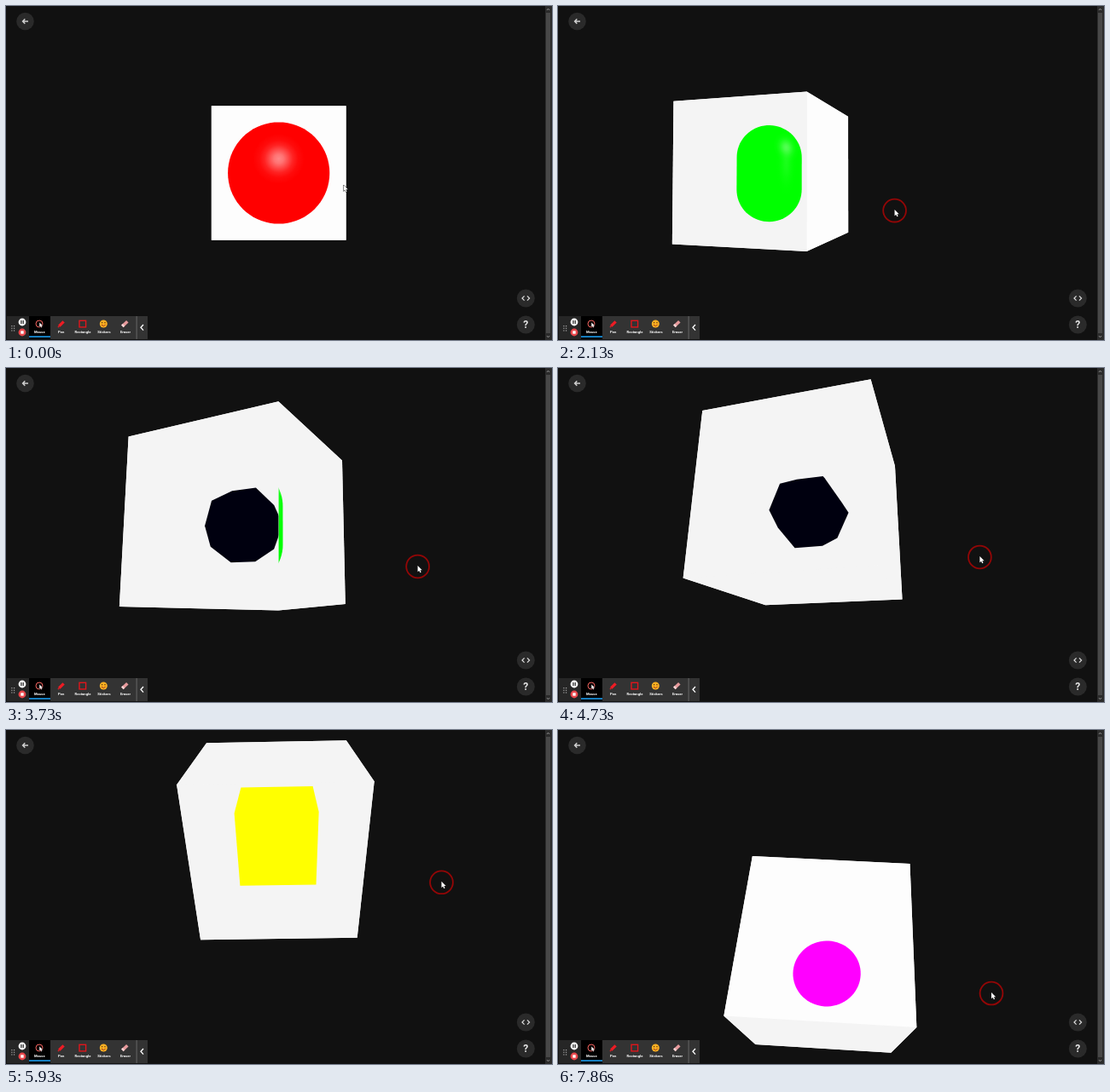
An HTML page with a canvas for the animation above (8 s loop, 640 by 392 pixels).

```html
<!DOCTYPE html>
<html lang="en">
<head>
<meta charset="utf-8">
<title>Portal cube</title>
<style>
  html, body { margin: 0; width: 100%; height: 100%; overflow: hidden; background: #111; }
  canvas { display: block; }
</style>
</head>
<body>
<canvas id="stage" width="640" height="392"></canvas>
<script>
const ctx = document.getElementById('stage').getContext('2d');
const LOOP = 8000, TAU = Math.PI * 2;
const CENTER_X = 319.7, CENTER_Y = 196, FOCAL = 473.2, DISTANCE = 3;
const PRESS_TIME = 860;

// Pointer path: time, x, y. Dragging it orbits the camera.
const pointerPath = [
  [0, 395.5, 211], [60, 395.5, 211], [800, 315.6, 241.6], [860, 315.6, 241.6],
  [1460, 357, 241], [1730, 375, 240.5], [2600, 417.5, 239.6], [2860, 433, 239],
  [3460, 473.5, 233.6], [4130, 496, 232], [4330, 496, 232], [4730, 494.4, 222],
  [5130, 500, 208], [5930, 510.5, 178.8], [6060, 510.5, 178.8], [6930, 512.8, 260],
  [7350, 517, 283], [7730, 509.5, 304], [7860, 508, 309], [8000, 507, 313]
];
const RADIANS_PER_PIXEL = TAU / 392;

const add = (a, b, k = 1) => a.map((v, i) => v + b[i] * k);
const dot = (a, b) => a[0] * b[0] + a[1] * b[1] + a[2] * b[2];
const cross = (a, b) => [a[1] * b[2] - a[2] * b[1], a[2] * b[0] - a[0] * b[2], a[0] * b[1] - a[1] * b[0]];
const unit = a => a.map(v => v / Math.hypot(...a));

function pointerAt(t) {
  const i = Math.max(1, pointerPath.findIndex(key => key[0] > t));
  const [t0, x0, y0] = pointerPath[i - 1], [t1, x1, y1] = pointerPath[i];
  const k = (t - t0) / (t1 - t0);
  return [x0 + (x1 - x0) * k, y0 + (y1 - y0) * k];
}

// ---- camera ----
let right, up, back, eye;

function setCamera(yaw, pitch) {
  const s = Math.sin(yaw), c = Math.cos(yaw), sp = Math.sin(pitch), cp = Math.cos(pitch);
  right = [c, 0, s];
  up = [sp * s, cp, -sp * c];
  back = [-s * cp, sp, c * cp];
  eye = back.map(v => v * DISTANCE);
}

function project(p) {
  const scale = FOCAL / (DISTANCE - dot(p, back));
  return [CENTER_X + dot(p, right) * scale, CENTER_Y - dot(p, up) * scale, scale];
}

function polygon(points) {
  const path = new Path2D();
  points.forEach(p => path.lineTo(p[0], p[1]));
  path.closePath();
  return path;
}

function hull(points) {
  const sorted = points.map(project).sort((a, b) => a[0] - b[0] || a[1] - b[1]);
  const half = list => {
    const chain = [];
    for (const p of list) {
      while (chain.length > 1) {
        const [a, b] = chain.slice(-2);
        if ((b[0] - a[0]) * (p[1] - a[1]) - (b[1] - a[1]) * (p[0] - a[0]) > 0) break;
        chain.pop();
      }
      chain.push(p);
    }
    return chain.slice(0, -1);
  };
  return polygon([...half(sorted), ...half(sorted.reverse())]);
}

// ---- geometry ----
const MIDDLE = [0, 0, -0.5];
const signs = [-1, 1];

function box(size) {
  const h = size / 2;
  return signs.flatMap(x => signs.flatMap(y => signs.map(z => add(MIDDLE, [x * h, y * h, z * h]))));
}

function dodecahedron(radius) {
  const k = radius / Math.sqrt(3), phi = (1 + Math.sqrt(5)) / 2;
  const edges = signs.flatMap(a => signs.flatMap(b => {
    const m = a * k / phi, n = b * k * phi;
    return [[0, m, n], [m, n, 0], [n, 0, m]];
  }));
  return [...box(2 * k), ...edges.map(p => add(MIDDLE, p))];
}

function ring(center, e1, e2, radius) {
  return Array.from({ length: 72 }, (_, i) => {
    const a = i * TAU / 72;
    return add(add(center, e1, radius * Math.cos(a)), e2, radius * Math.sin(a));
  });
}

// The circle where sight lines touch a ball.
function ballOutline(center, radius) {
  const toEye = add(eye, center, -1), d = Math.hypot(...toEye), view = unit(toEye);
  const e1 = unit(cross(view, [0, 1, 0])), e2 = cross(e1, view);
  return ring(add(center, view, radius * radius / d), e1, e2, radius * Math.sqrt(1 - (radius / d) ** 2));
}

const LIGHT = unit([0, 0.48, 0.877]);

function shine(outline, center, radius, strength, stretch = 1) {
  const view = unit(add(eye, center, -1));
  const normal = unit(add(view, LIGHT));
  const [x, y, scale] = project(add(center, normal, radius));
  const size = radius * scale * 0.45;
  const tilt = Math.atan2(-dot(normal, up), dot(normal, right));
  const glow = ctx.createRadialGradient(0, 0, 0, 0, 0, size);
  [[0, 1], [0.18, 0.86], [0.36, 0.56], [0.55, 0.26], [0.75, 0.08], [1, 0]]
    .forEach(([at, a]) => glow.addColorStop(at, `rgba(255,255,255,${a * strength})`));
  ctx.save();
  ctx.clip(outline);
  ctx.translate(x, y);
  if (stretch > 1) {
    ctx.translate(0, size);
    ctx.scale(0.7, stretch);
  } else {
    ctx.rotate(tilt);
    ctx.scale(Math.max(0.2, dot(normal, view)), 1);
  }
  ctx.fillStyle = glow;
  ctx.fillRect(-size, -size, size * 2, size * 2);
  ctx.restore();
}

function fillHull(points, color) {
  const outline = hull(points);
  ctx.fillStyle = color;
  ctx.fill(outline);
  return outline;
}

// ---- what each face reveals ----
const cubePoints = box(1), solid = dodecahedron(0.25), yellowBox = box(0.5);
const cone = [[0, 0.25, -0.5], ...ring([0, -0.25, -0.5], [1, 0, 0], [0, 0, 1], 0.25)];

function redBall() {
  const center = [0, 0, -1];
  shine(fillHull(ballOutline(center, 0.5), '#f00'), center, 0.5, 0.53);
}

function greenCapsule() {
  const top = [0, 0.125, -0.5], bottom = [0, -0.125, -0.5];
  const outline = fillHull([...ballOutline(top, 0.25), ...ballOutline(bottom, 0.25)], '#0f0');
  shine(outline, top, 0.25, 0.3);
  shine(outline, top, 0.25, 0.1, 2.2);
}

const faces = [
  { normal: [0, 0, 1], color: '#fdfdfd', reveal: redBall },
  { normal: [-1, 0, 0], color: '#f4f4f4', reveal: greenCapsule },
  { normal: [0, 0, -1], color: '#f4f4f4', reveal: () => fillHull(solid, '#00000f') },
  { normal: [0, -1, 0], color: '#f4f4f4', reveal: () => fillHull(yellowBox, '#ff0') },
  { normal: [0, 1, 0], color: '#fdfdfd', reveal: () => fillHull(cone, '#f0f') },
  { normal: [1, 0, 0], color: '#f4f4f4', reveal: () => {} }
];

function drawCube() {
  fillHull(cubePoints, '#f4f4f4');
  for (const { normal, color, reveal } of faces) {
    const center = add(MIDDLE, normal, 0.5);
    if (dot(add(eye, center, -1), normal) <= 0) continue;
    const corners = cubePoints.filter(p => dot(add(p, center, -1), normal) > -0.01);
    ctx.save();
    ctx.clip(fillHull(corners, color));
    reveal();
    ctx.restore();
  }
}

// ---- interface ----
function rect(x, y, w, h, color) {
  ctx.fillStyle = color;
  ctx.fillRect(x, y, w, h);
}

function disc(x, y, r, color) {
  ctx.fillStyle = color;
  ctx.beginPath();
  ctx.arc(x, y, r, 0, TAU);
  ctx.fill();
}

function stroke(d, color, width) {
  ctx.strokeStyle = color;
  ctx.lineWidth = width;
  ctx.stroke(new Path2D(d));
}

function label(text, x, y, font, color = '#fff') {
  ctx.font = font;
  ctx.textAlign = 'center';
  ctx.fillStyle = color;
  ctx.fillText(text, x, y);
}

function arrow(x, y, size = 1) {
  ctx.save();
  ctx.translate(x, y);
  ctx.scale(size, size);
  const shape = new Path2D('M0 0V7.2L1.7 5.7L2.8 8.2L4 7.7L2.9 5.2H5.1Z');
  ctx.strokeStyle = '#222';
  ctx.lineWidth = 1;
  ctx.stroke(shape);
  ctx.fillStyle = '#fff';
  ctx.fill(shape);
  ctx.restore();
}

function drawPage() {
  disc(22.5, 18, 10.3, '#2a2a2a');
  stroke('M26 18H19.8M22.3 15.3L19.6 18L22.3 20.7', '#d0d0d0', 1.5);
  disc(609.3, 343, 10.5, '#2a2a2a');
  stroke('M607.6 340.4L605 343L607.6 345.6M611 340.4L613.6 343L611 345.6', '#ddd', 1.2);
  disc(609.3, 374, 10.5, '#2a2a2a');
  label('?', 609.3, 378.4, 'bold 12px Roboto, sans-serif', '#e4e4e4');
  rect(632, 0, 8, 392, '#2b2b2b');
  rect(633, 8, 5, 376, '#484848');
  stroke('M634 5L635.5 3L637 5M634 387L635.5 389L637 387', '#888', 1);
}

function drawToolbar() {
  rect(1, 364, 165, 27, '#333');
  rect(1, 364, 26, 27, '#262626');
  for (const x of [6.3, 9]) for (const y of [375, 377.7, 380.4]) rect(x, y, 1.2, 1.2, '#aaa');
  disc(19, 371, 4.4, '#fff');
  rect(17.3, 369, 1.2, 4, '#222');
  rect(19.6, 369, 1.2, 4, '#222');
  disc(19, 383, 4.4, '#e8474c');
  rect(17.3, 381.3, 3.4, 3.4, '#fff');

  rect(27, 364, 25, 27, '#000');
  rect(27, 387.3, 25, 1.7, '#1993e0');
  ctx.strokeStyle = '#f2635f';
  ctx.lineWidth = 1;
  ctx.beginPath();
  ctx.arc(39, 373, 4, 0, TAU);
  ctx.stroke();
  arrow(39.3, 371.5, 0.7);

  stroke('M62.3 375.6L67.6 370.4', '#ee1c24', 3.4);
  stroke('M61 377L62.2 375.8', '#ee1c24', 1.4);
  ctx.strokeStyle = '#e0161c';
  ctx.strokeRect(86, 369.3, 7.6, 7.6);
  disc(114.3, 373, 4.5, '#fdb022');
  rect(112, 371, 1.2, 1.3, '#5a3510');
  rect(115.4, 371, 1.2, 1.3, '#5a3510');
  stroke('M112 374.2Q114.3 377 116.6 374.2', '#a1371c', 1);
  stroke('M136.5 375.7L142.3 370.2', '#e79a9c', 3.6);
  stroke('M136.3 375.9L138 374.3', '#f5d6d6', 3.6);

  [['Mouse', 39.3], ['Pen', 64.7], ['Rectangle', 90], ['Stickers', 115], ['Eraser', 140]]
    .forEach(([text, x]) => label(text, x, 384, 'bold 4.2px Roboto, sans-serif'));
  rect(152.6, 364, 1, 27, '#666');
  stroke('M161 374L158 377.3L161 380.6', '#fff', 1.3);
}

function draw() {
  const t = performance.now() % LOOP;
  const [x, y] = pointerAt(t);
  const pressed = t >= PRESS_TIME;
  setCamera(pressed ? (x - 315.6) * RADIANS_PER_PIXEL : 0, pressed ? (y - 241.6) * RADIANS_PER_PIXEL : 0);

  rect(0, 0, 640, 392, '#111');
  drawCube();
  drawPage();
  drawToolbar();
  if (pressed) {
    ctx.strokeStyle = 'rgba(220,0,0,.64)';
    ctx.lineWidth = 1.8;
    ctx.beginPath();
    ctx.arc(x, y, 13.4, 0, TAU);
    ctx.stroke();
  }
  arrow(x, y - 1);
  requestAnimationFrame(draw);
}
draw();
</script>
</body>
</html>
```
